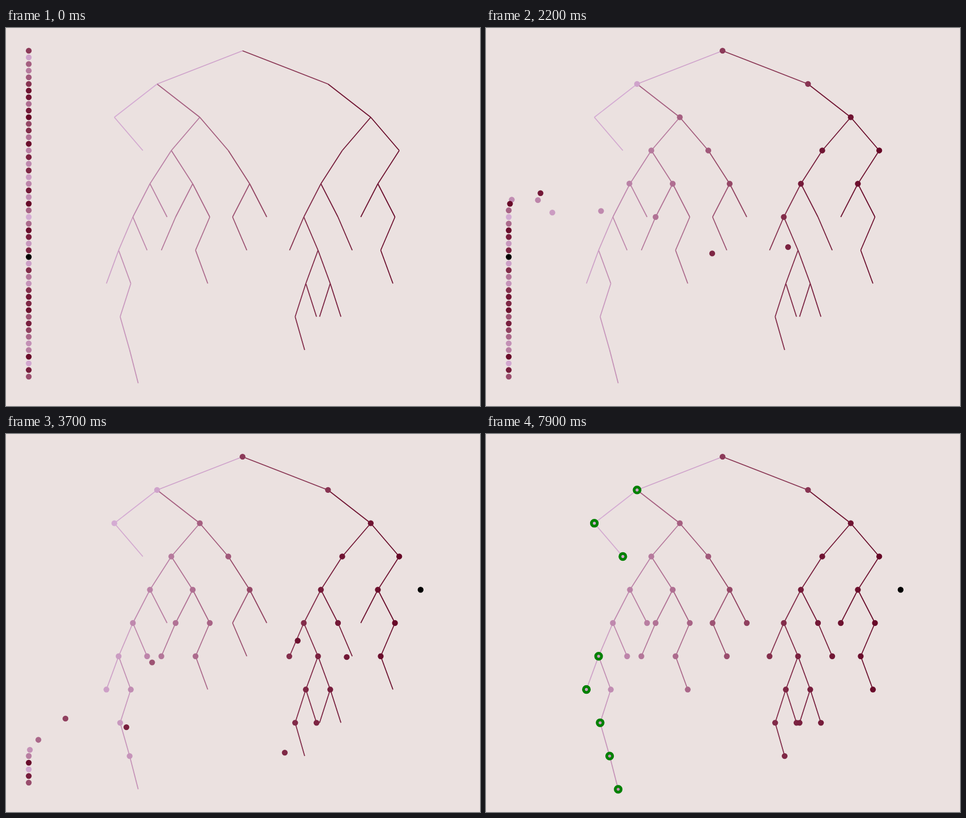
An HTML page that plays this animation: 838 px wide and 668 px high, repeating every 8 s.

```html
<!DOCTYPE html>
<html lang="en">
<head>
<meta charset="utf-8">
<title>Tree sort</title>
<style>
  html, body { margin: 0; width: 100%; height: 100%; overflow: hidden; background: #ebe1e0; }
  svg { display: block; width: 838px; height: 668px; }
  line { stroke-width: 1.7; }
  circle { stroke-width: 0; }
  .visited { stroke: green; stroke-width: 5; }
</style>
</head>
<body>
<svg viewBox="0 0 838 668"><g id="edges"></g><g id="dots"></g></svg>
<script>
const LOOP = 8000;
const FLIGHT = { start: 524.5, stagger: 70, duration: 700 };
const VISIT = { start: 5340, interval: 350 };
const MARGIN = 40.2, HEIGHT = 587.6, ROOT_X = 418.2, SPREAD = 151.1, MAX_DEPTH = 10;

// The unsorted input: the search tree, its colours and the visiting order all follow from it.
const keys = [
  26, 2, 20, 13, 21, 27, 42, 41, 16, 38, 48, 24, 29, 15, 44, 11, 34, 9, 32, 4, 10, 39, 8, 47, 19,
  0, 17, 45, 36, 5, 33, 49, 3, 30, 14, 6, 28, 40, 31, 43, 22, 35, 25, 18, 7, 12, 46, 1, 37, 23
];

const blend = (from, to, share) => `color-mix(in srgb, ${to} ${share * 100}%, ${from})`;

function colorOf(key) {
  const rank = key / (keys.length - 1);
  if (rank < 0.41) return blend('#d4abd3', '#a55f80', rank / 0.41);
  if (rank < 0.57) return blend('#a55f80', '#842e4c', (rank - 0.41) / 0.16);
  return blend('#842e4c', '#640524', (rank - 0.57) / 0.43);
}

function draw(parent, tag, attributes, style) {
  const shape = document.createElementNS('http://www.w3.org/2000/svg', tag);
  for (const name in attributes) shape.setAttribute(name, attributes[name]);
  Object.assign(shape.style, style);
  return document.getElementById(parent).appendChild(shape);
}

function insert(root, key) {
  let parent = null, node = root, side, depth = 0, x = ROOT_X;
  while (node) {
    parent = node;
    side = key < node.key ? 'left' : 'right';
    depth++;
    x += (side === 'left' ? -SPREAD : SPREAD) / depth;
    node = node[side];
  }
  node = { key, x, y: MARGIN + HEIGHT * depth / MAX_DEPTH };
  if (parent) {
    parent[side] = node;
    draw('edges', 'line', { x1: parent.x, y1: parent.y, x2: node.x, y2: node.y }, { stroke: colorOf(key) });
  }
  return node;
}

const nodes = [];
keys.forEach((key, i) => {
  const node = insert(nodes[0], key);
  node.startY = MARGIN + HEIGHT * i / keys.length;
  node.dot = draw('dots', 'circle', { r: 5.15 }, { fill: colorOf(key) });
  nodes.push(node);
});

const clamp = v => Math.min(1, Math.max(0, v));
const cubicInOut = u => u < 0.5 ? 4 * u ** 3 : 1 - 4 * (1 - u) ** 3;

function render() {
  const t = performance.now() % LOOP;
  nodes.forEach((node, i) => {
    const p = cubicInOut(clamp((t - FLIGHT.start - i * FLIGHT.stagger) / FLIGHT.duration));
    node.dot.setAttribute('cx', MARGIN + (node.x - MARGIN) * p);
    node.dot.setAttribute('cy', node.startY + (node.y - node.startY) * p);
    node.dot.classList.toggle('visited', t >= VISIT.start + node.key * VISIT.interval);
  });
  requestAnimationFrame(render);
}
render();
</script>
</body>
</html>
```
